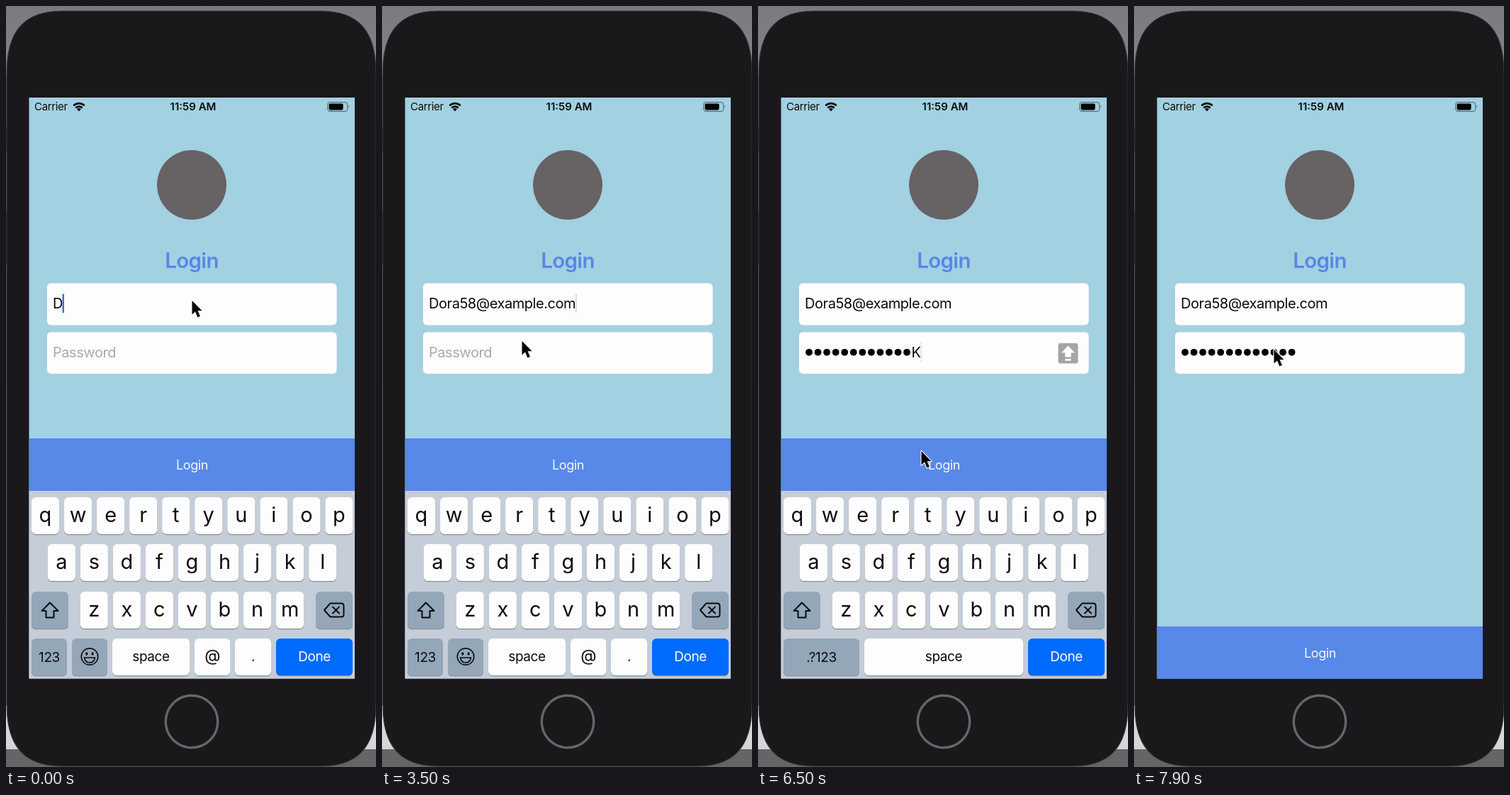
An HTML page for the animation above (8 s loop, 522 by 1072 pixels).

```html
<!DOCTYPE html>
<html lang="en">
<head>
<meta charset="utf-8">
<title>Login screen</title>
<style>
  html, body { margin: 0; width: 100%; height: 100%; overflow: hidden; }
  svg { display: block; width: 100vw; height: 100vh; }
  text { font-family: Inter, Roboto, sans-serif; letter-spacing: -.022em; fill: #0b0b0d; }
  .mid { text-anchor: middle; }
  .field { font-size: 20px; }
  .letter { font-size: 29px; letter-spacing: 0; }
  .label { font-size: 19px; }
  .box { fill: #fefdfe; stroke: #b9cbd4; stroke-width: 1; }
  .line { fill: none; stroke: #0b0b0d; stroke-width: 2; stroke-linejoin: round; stroke-linecap: round; }
</style>
</head>
<body>
<svg viewBox="0 0 522 1072" preserveAspectRatio="none">
  <defs>
    <linearGradient id="desk" x2="0" y2="1">
      <stop offset="0" stop-color="#7b7a7e"/>
      <stop offset=".1" stop-color="#858488"/>
      <stop offset=".9" stop-color="#d6d6d8"/>
    </linearGradient>
    <clipPath id="screen"><rect x="32.5" y="129" width="459.5" height="818.5"/></clipPath>
  </defs>

  <rect width="522" height="1072" fill="url(#desk)"/>
  <rect y="1047" width="522" height="25" fill="#656467"/>
  <path d="M0 100V985" stroke="#4a494c" stroke-width="1.5"/>
  <path d="M0 125V126M0 170V204M0 290V364" stroke="#18171a" stroke-width="2"/>
  <path d="M1 95C1 35 25 7 80 7H443C498 7 522 35 522 95V983C522 1043 498 1071 443 1071H80C25 1071 1 1043 1 983Z"
        fill="#1a181b" stroke="#3c3b3e"/>
  <circle cx="262" cy="1008" r="36.7" fill="none" stroke="#67656a" stroke-width="3.4"/>

  <g clip-path="url(#screen)">
    <rect x="32" y="129" width="461" height="819" fill="#a2d1e2"/>

    <text x="40" y="147" font-size="15">Carrier</text>
    <g fill="none" stroke="#0b0b0d" stroke-width="2.6">
      <path d="M95.3 140.3A11 11 0 0 1 110.7 140.3"/>
      <path d="M98.3 143.6A6.6 6.6 0 0 1 107.7 143.6"/>
    </g>
    <path d="M103 148.3L100.2 145.4A4 4 0 0 1 105.8 145.4Z"/>
    <text class="mid" x="264" y="147" font-size="15" font-weight="600" style="letter-spacing:0">11:59 AM</text>
    <rect x="453.7" y="135.6" width="28" height="12.8" rx="3.6" fill="none" stroke="#59717a" stroke-width="1.2"/>
    <rect x="455.6" y="137.4" width="20" height="9.2" rx="1.8"/>
    <path d="M483.4 139.8Q485.6 142 483.4 144.2Z" fill="#59717a"/>

    <circle cx="262" cy="252" r="49" fill="#676264"/>
    <text class="mid" x="262" y="368.5" font-size="29.5" font-weight="600" style="fill:#5a86e8">Login</text>

    <rect class="box" x="57.5" y="390" width="409.5" height="60" rx="6"/>
    <rect class="box" x="57.5" y="459" width="409.5" height="59.5" rx="6"/>
    <text class="field" id="email" x="66" y="426"></text>
    <text class="field" id="hint" x="66" y="495" style="fill:#a9a9ad">Password</text>
    <g id="dots"></g>
    <text class="field" id="lastChar" y="495"></text>
    <rect id="caret" width="2.5" height="27" rx="1" fill="#426fd6"/>
    <g id="caps">
      <rect x="423.5" y="475" width="28" height="28.5" rx="3" fill="#a5a5a8"/>
      <path d="M437.5 478.5L447 488.5H441.7V494.5H433.3V488.5H428Z M433.3 497H441.7V499.8H433.3Z" fill="#fff"/>
    </g>

    <g id="button">
      <rect x="32" y="609" width="461" height="74" fill="#5888e8"/>
      <text class="mid" x="262.5" y="652.5" font-size="18" style="fill:#f4f7fd">Login</text>
    </g>

    <g id="keyboard">
      <rect x="32" y="683" width="461" height="266" fill="rgb(205,204,214)" fill-opacity=".82"/>
      <g id="letters"></g>
      <g id="emailRow"></g>
      <g id="passwordRow"></g>
    </g>
  </g>

  <path id="pointer" d="M0 0V19.6L4.5 15.5L7.9 23.4L11.4 21.9L8 14.2H14Z"
        stroke="#fff" stroke-width="2.2" paint-order="stroke" stroke-linejoin="round"/>
</svg>

<script>
const LOOP = 8000, STEP = 100;
const EMAIL = 'Dora58@example.com';
const PASSWORD = 'ADSFJKLASDFJK';
const EMAIL_END = 2830, FOCUS_PASSWORD = 3850, CAPS_ON = 4400;
const PASSWORD_START = 4500, SECOND_CHAR = 4700, PASSWORD_END = 5820;
const DISMISS = 6576, SLIDE = 450;
const DOT = 12.55;
const POINTER_PATH = [
  [0, 262.5, 415], [2900, 262.5, 415], [3400, 197.5, 472], [5950, 197.5, 472],
  [6400, 230.5, 627], [7000, 230.5, 627], [7400, 236, 948], [7500, 236, 948], [7900, 197.5, 484]
];

const $ = id => document.getElementById(id);
const clamp = (v, lo = 0, hi = 1) => Math.min(hi, Math.max(lo, v));
const show = (id, on) => { $(id).style.display = on ? '' : 'none'; };
const setText = (id, value) => { if ($(id).textContent !== value) $(id).textContent = value; };

// Keyboard
function key(x, y, w, { fill = '#fefdfe', text = '', cls = 'label', drop = 32, color = '#0b0b0d', art = '' } = {}) {
  const rect = (dy, c) => `<rect x="${x}" y="${y + dy}" width="${w}" height="52" rx="6" fill="${c}"/>`;
  return rect(1.3, '#888e95') + rect(0, fill) +
    `<text class="mid ${cls}" x="${x + w / 2}" y="${y + drop}" style="fill:${color}">${text}</text>` + art;
}
const DARK = '#93a7b9';
const row = (chars, x, y) => [...chars].map((c, i) =>
  key(x + i * 46.05, y, 39, { text: c, cls: 'letter', drop: 34.5 })).join('');
const done = key(381, 891, 108, { fill: '#006bff', text: 'Done', color: '#fff' });

const shiftArt = '<path class="line" d="M62 840.5L73.5 852H67.5V861.5H56.5V852H50.5Z"/>';
const deleteArt = '<path class="line" d="M457.5 841.5H473Q476.5 841.5 476.5 845V857Q476.5 860.5 473 860.5H457.5L449 851Z' +
  'M461 846.5L470 855.5M470 846.5L461 855.5"/>';
const smileArt = '<circle class="line" cx="118" cy="916.5" r="11.7" style="stroke-width:1.7"/>' +
  '<ellipse cx="113.8" cy="912.5" rx="1.5" ry="2.3"/><ellipse cx="122.2" cy="912.5" rx="1.5" ry="2.3"/>' +
  '<path class="line" style="stroke-width:1.6" d="M110.5 918H125.5Q124 925 118 925T110.5 918Z"/>';

$('letters').innerHTML =
  row('qwertyuiop', 36, 692) + row('asdfghjkl', 58.8, 758) + row('zxcvbnm', 104.8, 825) +
  key(36, 825, 52, { fill: DARK, art: shiftArt }) +
  key(437, 825, 52, { fill: DARK, art: deleteArt });
$('emailRow').innerHTML =
  key(36, 891, 50, { fill: DARK, text: '123', drop: 33 }) +
  key(93, 891, 50, { fill: DARK, art: smileArt }) +
  key(150, 891, 109, { text: 'space' }) +
  key(266, 891, 50.5, { text: '<tspan font-size="23">@</tspan>' }) +
  key(323, 891, 51, { text: '.' }) + done;
$('passwordRow').innerHTML =
  key(36, 891, 107, { fill: DARK, text: '.?123', drop: 33 }) +
  key(150, 891, 224, { text: 'space' }) + done;

$('dots').innerHTML = [...PASSWORD].map((_, i) =>
  `<circle cx="${72 + i * DOT}" cy="487.8" r="4.9"/>`).join('');

// Motion
function pointerAt(t) {
  const i = POINTER_PATH.findIndex(p => p[0] > t);
  if (i < 0) return POINTER_PATH[POINTER_PATH.length - 1].slice(1);
  const [t0, x0, y0] = POINTER_PATH[i - 1], [t1, x1, y1] = POINTER_PATH[i];
  const u = (t - t0) / (t1 - t0), e = u * u * (3 - 2 * u);
  return [x0 + (x1 - x0) * e, y0 + (y1 - y0) * e];
}

function passwordCount(t) {
  if (t < PASSWORD_START) return 0;
  if (t < SECOND_CHAR) return 1;
  const pace = (PASSWORD_END - SECOND_CHAR) / (PASSWORD.length - 2);
  return Math.min(PASSWORD.length, 2 + Math.floor((t - SECOND_CHAR) / pace));
}

function blink(idle) {
  if (idle < 0) return 1;
  const u = idle % 1000;
  return u < 500 ? 1 : u < 850 ? clamp((710 - u) / 210) : (u - 850) / 150;
}

function render(t) {
  const onPassword = t >= FOCUS_PASSWORD, dismissed = t >= DISMISS;
  const emailCount = Math.min(EMAIL.length, 1 + Math.floor(t * (EMAIL.length - 1) / EMAIL_END + .01));
  const count = passwordCount(t);
  const hidden = dismissed ? count : Math.max(0, count - 1);

  setText('email', EMAIL.slice(0, emailCount));
  setText('lastChar', PASSWORD.slice(hidden, count));
  $('lastChar').setAttribute('x', 66 + hidden * DOT);
  [...$('dots').children].forEach((dot, i) => { dot.style.display = i < hidden ? '' : 'none'; });
  show('hint', count === 0);
  show('caps', t >= CAPS_ON && !dismissed);
  show('emailRow', !onPassword);
  show('passwordRow', onPassword);

  const end = onPassword
    ? 66 + hidden * DOT + (count > hidden ? $('lastChar').getComputedTextLength() : 0)
    : 66 + $('email').getComputedTextLength();
  const idle = !onPassword ? t - EMAIL_END : count ? t - PASSWORD_END : t - FOCUS_PASSWORD;
  $('caret').setAttribute('x', end - .5);
  $('caret').setAttribute('y', onPassword ? 474 : 405.5);
  $('caret').style.opacity = dismissed ? 0 : blink(idle);

  const slide = 1 - (1 - clamp((t - DISMISS) / SLIDE)) ** 3;
  $('keyboard').setAttribute('transform', `translate(0 ${slide * 266})`);
  $('button').setAttribute('transform', `translate(0 ${dismissed ? 265 : 0})`);
  $('pointer').setAttribute('transform', `translate(${pointerAt(t)})`);
}

function tick() {
  render(Math.floor(performance.now() % LOOP / STEP) * STEP);
  requestAnimationFrame(tick);
}
tick();
</script>
</body>
</html>
```
